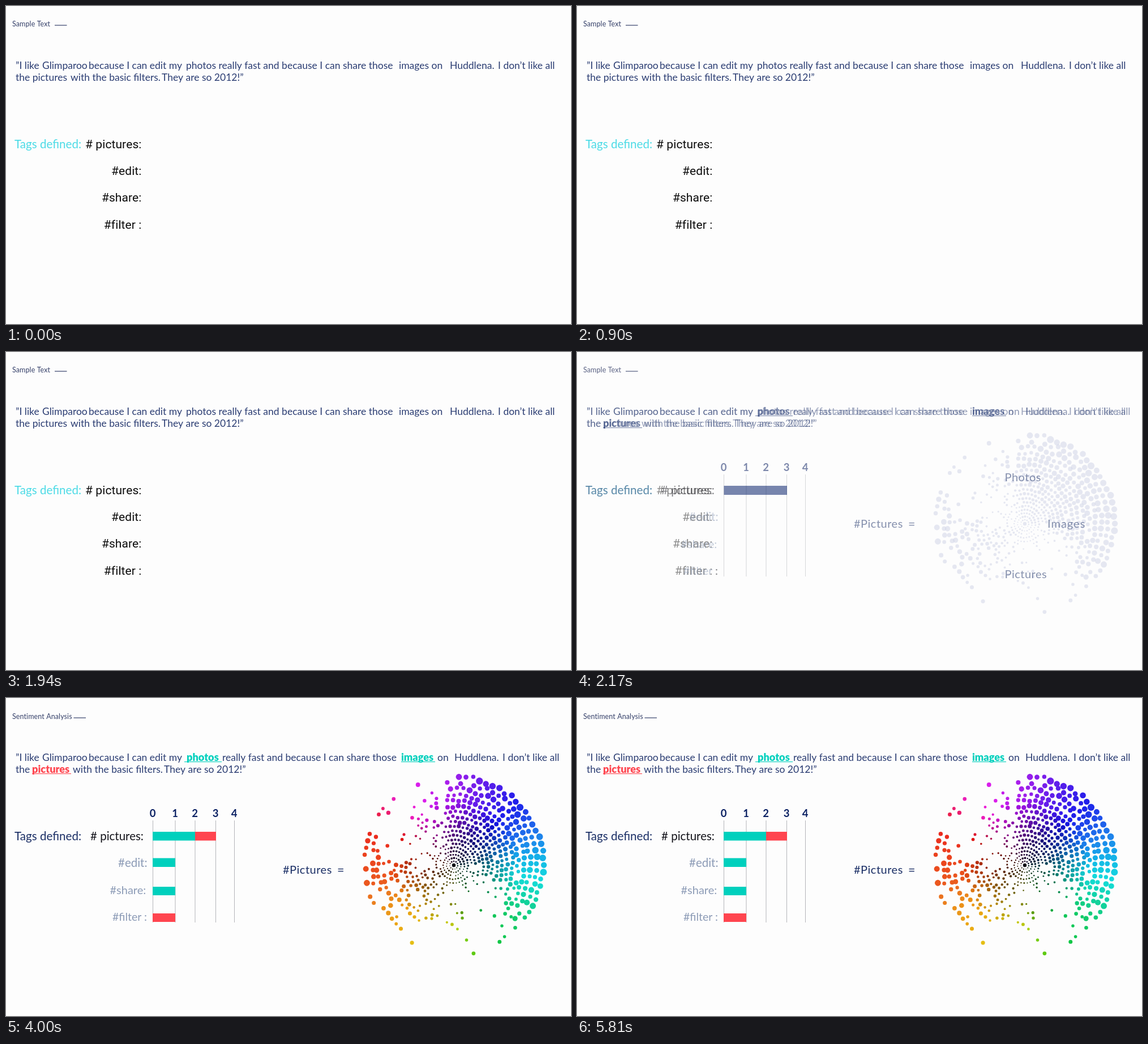
These frames come from a looping animation (998 px wide and 561 px high, 5.97 s). An HTML page with a canvas:

```html
<!DOCTYPE html>
<html lang="en">
<head>
<meta charset="utf-8">
<title>Sentiment analysis</title>
<style>
  html, body { margin: 0; width: 100%; height: 100%; overflow: hidden; background: #fdfdfd; }
  canvas { display: block; }
</style>
</head>
<body>
<canvas id="stage" width="998" height="561"></canvas>
<script>
const ctx = document.getElementById('stage').getContext('2d');
const LOOP = 5970;
const NAVY = '#1b2f66', GREY = '#8c9bb6', TEAL = '#00d0bd', RED = '#ff454f';

function text(str, x, y, size, color, { weight = 400, family = 'Lato', spacing = 0, align = 'left' } = {}) {
  ctx.font = `${weight} ${size}px ${family}, sans-serif`;
  ctx.letterSpacing = spacing + 'px';
  ctx.textAlign = align;
  ctx.fillStyle = color;
  ctx.fillText(str, x, y);
}

function rect(x, y, w, h, color) {
  ctx.fillStyle = color;
  ctx.fillRect(x, y, w, h);
}

function header(title, baseline, lineX) {
  text(title, 11, baseline, 12.5, '#36416a', { spacing: .1 });
  rect(lineX, baseline - 2.6, 21.5, 1.2, '#36416a');
}

const quote = (str, x, y = 111) => text(str, x, y, 17.5, '#2a3c72');
const quote2 = (str, x) => quote(str, x, 132);

function keyword(str, x, y, lineX, lineW, color) {
  text(str, x, y, 18.2, color, { weight: 900 });
  rect(lineX, y + 1, lineW, 1.1, color);
}

// Dot vortex: [angle in degrees, hue, density]
const SECTORS = [
  [-90, 278, .6], [-72, 262, 1], [-45, 240, 1], [-20, 212, 1], [0, 190, 1],
  [22, 168, .9], [42, 148, .6], [58, 140, .12], [90, 65, .1], [125, 45, .14],
  [150, 33, .5], [168, 17, .75], [190, 9, .65], [208, 0, .3], [228, -45, .12],
  [250, -70, .25], [270, -82, .6]
];

function sector(angle) {
  const i = SECTORS.findIndex(s => s[0] > angle);
  const [a, b] = [SECTORS[i - 1], SECTORS[i]];
  const k = (angle - a[0]) / (b[0] - a[0]);
  const [hue, density] = [1, 2].map(n => a[n] + (b[n] - a[n]) * k);
  return { hue, density };
}

function makeDots() {
  let seed = 11;
  const random = () => (seed = seed * 16807 % 2147483647) / 2147483647;
  const dots = [{ x: 0, y: 0, size: 3.2, color: '#080810' }];
  for (let r = 7; r < 160; r += 5.4 + r * .043) {
    const count = Math.round(2 * Math.PI * r / (3.7 + r * .056));
    const turn = random();
    for (let i = 0; i < count; i++) {
      const angle = ((i + turn) / count * 360) % 360 - 90;
      const { hue } = sector(angle);
      // The dense arms trail backwards towards the middle.
      const { density } = sector((angle + 90 + (157 - r) * .22) % 360 - 90);
      const jitter = (random() - .5) * r * .04;
      const scale = .75 + random() * .45;
      if (random() > Math.max(density, 1.4 - r / 42)) continue;
      const rad = angle * Math.PI / 180;
      const full = 48 - 10 * Math.max(0, Math.cos((hue - 120) * Math.PI / 180));
      dots.push({
        x: Math.cos(rad) * (r + jitter),
        y: Math.sin(rad) * (r + jitter),
        size: (1.3 + r * .025) * (.6 + .4 * density) * scale,
        color: `hsl(${hue} 84% ${4 + full * Math.min(1, r / 115)}%)`
      });
    }
  }
  return dots;
}
const dots = makeDots();

function vortex(cx, cy, flat) {
  for (const { x, y, size, color } of dots) {
    ctx.fillStyle = flat || color;
    ctx.beginPath();
    ctx.arc(cx + x, cy + y, size, 0, 7);
    ctx.fill();
  }
}

function intro() {
  header('Sample Text', 36, 86);
  quote('”I like', 17);
  quote('Glimparoo', 64);
  quote('because I can edit my', 146);
  quote('photos really fast and because I can share those', 318);
  quote('images on', 694);
  quote('Huddlena.', 784);
  quote('I don’t like all', 869);
  quote2('the pictures', 17);
  quote2('with the basic filters.', 114);
  quote2('They are so 2012!”', 275);
  text('Tags defined:', 15, 251, 20.6, '#4cdbe6');
  ['# pictures:', '#edit:', '#share:', '#filter :'].forEach((tag, i) =>
    text(tag, 239.5, 251 + i * 47.2, 21, '#0c0c0c', { family: 'Roboto', spacing: .1, align: 'right' }));
}

function chart(sentiment) {
  if (sentiment) header('Sentiment Analysis', 37, 119.5);
  else header('Sample Text', 36, 86);

  const good = sentiment ? TEAL : '#0a2265', bad = sentiment ? RED : '#0a2265';
  quote('”I like', 17);
  quote('Glimparoo', 64);
  quote('because I can edit my', 146);
  keyword('photos', 319, 111, 315, 66, good);
  quote('really fast and because I can share those', 382);
  keyword('images', 698, 111, 698, 60, good);
  quote('on', 762);
  quote('Huddlena.', 792);
  quote('I don’t like all', 877);
  quote2('the', 17);
  keyword('pictures', 46, 132, 46, 69, bad);
  quote2('with the basic filters.', 118);
  quote2('They are so 2012!”', 279);

  text('Tags defined:', 15, 251, 20.6, NAVY);
  text('# pictures:', 149, 251, 20.5, '#15151c');
  text('#edit:', 198, 298, 20.5, GREY);
  text('#share:', 183.5, 345.5, 20, GREY);
  text('#filter', 188, 392.5, 19.5, GREY);
  text(':', 244, 392.5, 20, sentiment ? GREY : '#15151c');

  [259.5, 299, 334, 370.5, 403.5].forEach((x, i) => {
    text(i, x - .5, 209.5, 18.5, '#0b2163', { weight: 700, align: 'center' });
    rect(x - .5, 216, 1, 180, '#b4b5ba');
  });
  if (sentiment) {
    rect(259, 236, 75, 15.5, TEAL);
    rect(334, 236, 37, 15.5, RED);
    rect(259, 282.5, 40, 15.5, TEAL);
    rect(259, 333, 40, 15, TEAL);
    rect(259, 380, 40, 15, RED);
  } else {
    rect(259.5, 236, 111.5, 16, '#001b66');
  }

  const wide = { spacing: .5 };
  text('#Pictures', 489, 310, 20, NAVY, wide);
  text('=', 585, 310.5, 21.5, NAVY);
  if (sentiment) {
    vortex(791, 295);
  } else {
    vortex(791, 303, '#cfd4e6');
    text('Photos', 755.5, 228, 20, NAVY, wide);
    text('Images', 831, 310, 20, NAVY, { spacing: 1 });
    text('Pictures', 755.5, 398.5, 20, NAVY, wide);
  }
}

const scenes = [
  { start: 0, fade: 0, draw: intro },
  { start: 1960, fade: 400, draw: () => chart(false) },
  { start: 3650, fade: 340, draw: () => chart(true) }
];

function frame() {
  const t = performance.now() % LOOP;
  const last = scenes.findLastIndex(s => t >= s.start);
  for (let i = Math.max(0, last - 1); i <= last; i++) {
    const { start, fade, draw } = scenes[i];
    ctx.globalAlpha = fade ? Math.min(1, (t - start) / fade) : 1;
    rect(0, 0, 998, 561, '#fdfdfd');
    draw();
  }
  requestAnimationFrame(frame);
}
frame();
</script>
</body>
</html>
```
